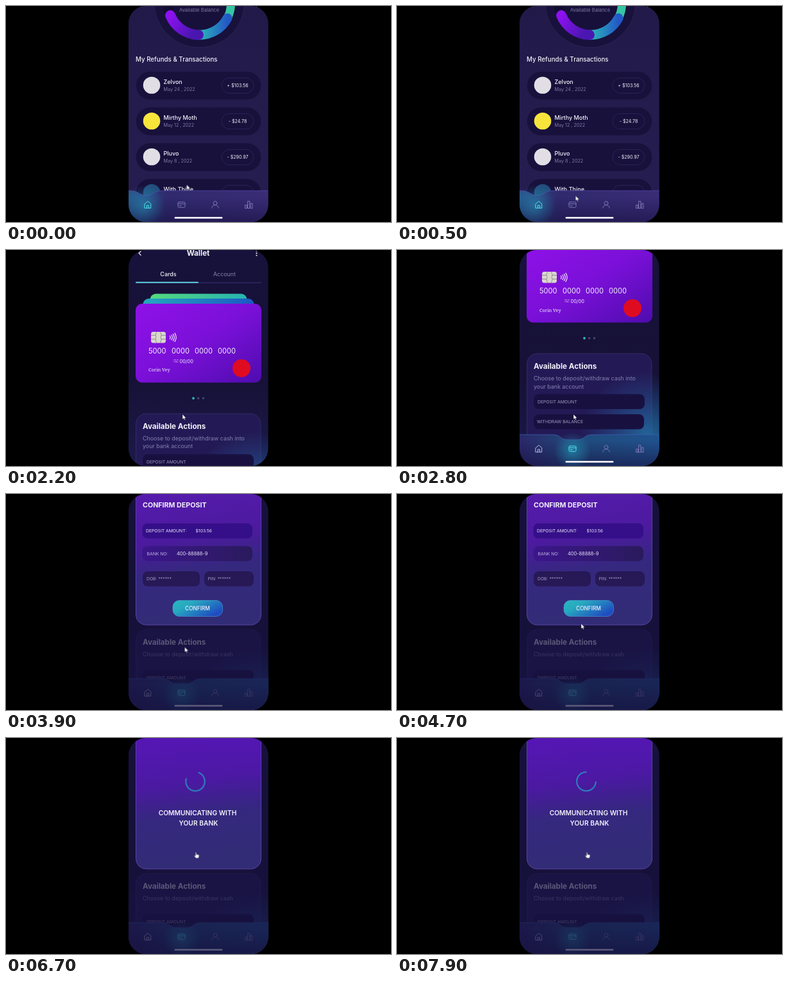
An HTML page for the animation above (8000 ms loop, 600 by 338 pixels).

```html
<!DOCTYPE html>
<html lang="en">
<head>
<meta charset="utf-8">
<title>Wallet app</title>
<style>
html, body { margin: 0; width: 100%; height: 100%; overflow: hidden; background: #000; }
svg { display: block; width: 100vw; height: 100vh; }
text { font-family: Inter, "Open Sans", sans-serif; fill: #f3f1fb; }
.mid { text-anchor: middle; }
.h1 { font-size: 11.65px; font-weight: 700; }
.h2 { font-size: 9.75px; font-weight: 500; }
.body { font-size: 8.9px; fill: #8580b0; }
.name { font-size: 9px; font-weight: 500; }
.date { font-size: 7.2px; fill: #7f79a8; }
.sum { font-size: 7.1px; text-anchor: middle; }
.label { font-size: 6.8px; fill: #a09bc0; }
.lit { fill: #e9e5fa; }
.digits { font-size: 11.1px; }
.icon { fill: none; stroke: #7d76b2; stroke-width: 1; stroke-linejoin: round; stroke-linecap: round; }
.on { stroke: #4fe3ea; }
.pale { stroke: #bdb9df; }

.home, .page, .bar, .dim, .extra, .form, .load, .cursor, .arrow, .hand {
  animation: 8s linear infinite;
}
.home { animation-name: home; }
.page { animation-name: scroll; }
.bar { animation-name: bar; }
.dim { animation-name: dim; }
.extra { animation-name: extra; }
.form { animation-name: form; }
.load { animation-name: load; }
.cursor { animation-name: move; animation-timing-function: ease-in-out; }
.arrow { animation-name: arrow; animation-timing-function: step-end; }
.hand { animation-name: hand; animation-timing-function: step-end; }
.spin { transform-origin: 295px 68px; animation: spin 1s linear infinite; }

@keyframes home { 0%, 16.5% { opacity: 1; } 21%, 100% { opacity: 0; } }
@keyframes scroll {
  0%, 27.5% { transform: translateY(0); animation-timing-function: ease-in-out; }
  34.5%, 42% { transform: translateY(-94px); animation-timing-function: ease-out; }
  46%, 100% { transform: translateY(-44px); }
}
@keyframes bar {
  0%, 28% { transform: translateY(52px); animation-timing-function: ease-out; }
  33%, 100% { transform: none; }
}
@keyframes dim { 0%, 42% { opacity: 0; } 46.5%, 100% { opacity: 1; } }
@keyframes extra { 0%, 42% { opacity: 1; } 46%, 100% { opacity: 0; } }
@keyframes form { 0%, 72.5% { opacity: 1; } 76%, 100% { opacity: 0; } }
@keyframes load { 0%, 72.5% { opacity: 0; } 76%, 100% { opacity: 1; } }
@keyframes move {
  0% { transform: translate(281.5px, 279.5px); }
  10% { transform: translate(277px, 304px); }
  13.75%, 17.5% { transform: translate(276px, 307px); }
  26%, 39% { transform: translate(275px, 257px); }
  43%, 50% { transform: translate(278.5px, 239.5px); }
  66%, 72% { transform: translate(293px, 176.5px); }
  80%, 100% { transform: translate(296.5px, 178.5px); }
}
@keyframes arrow { 0% { opacity: 1; } 61%, 100% { opacity: 0; } }
@keyframes hand { 0% { opacity: 0; } 61%, 100% { opacity: 1; } }
@keyframes spin { from { transform: rotate(36deg); } to { transform: rotate(396deg); } }
</style>
</head>
<body>
<svg viewBox="0 0 600 338">
<defs>
  <clipPath id="phone"><rect x="191" width="217.600" height="338" rx="27"/></clipPath>
  <linearGradient id="homeBg" x2="0" y2="1">
    <stop stop-color="#211a49"/><stop offset=".5" stop-color="#241c4d"/><stop offset="1" stop-color="#261e51"/>
  </linearGradient>
  <linearGradient id="walletBg" x2="0" y2="1">
    <stop stop-color="#17123b"/><stop offset=".6" stop-color="#171136"/><stop offset="1" stop-color="#1a1a4b"/>
  </linearGradient>
  <linearGradient id="homeBar">
    <stop stop-color="#27568c"/><stop offset=".28" stop-color="#302a6e"/><stop offset="1" stop-color="#3a2c76"/>
  </linearGradient>
  <linearGradient id="walletBar">
    <stop stop-color="#2b2768"/><stop offset=".4" stop-color="#204a7b"/><stop offset="1" stop-color="#20528e"/>
  </linearGradient>
  <linearGradient id="shade" x2="0" y2="1">
    <stop stop-color="#171040" stop-opacity="0"/><stop offset="1" stop-color="#171040" stop-opacity=".6"/>
  </linearGradient>
  <radialGradient id="glow">
    <stop stop-color="#25b4cf" stop-opacity=".75"/><stop offset="1" stop-color="#25b4cf" stop-opacity="0"/>
  </radialGradient>
  <radialGradient id="blue">
    <stop stop-color="#217fb0" stop-opacity=".75"/><stop offset="1" stop-color="#2566a8" stop-opacity="0"/>
  </radialGradient>
  <linearGradient id="violet" x2="1" y2="1">
    <stop stop-color="#9011e8"/><stop offset=".5" stop-color="#7a10d8"/><stop offset="1" stop-color="#4e0cae"/>
  </linearGradient>
  <linearGradient id="green"><stop stop-color="#55da7d"/><stop offset="1" stop-color="#26b3b2"/></linearGradient>
  <linearGradient id="sea"><stop stop-color="#24a9bd"/><stop offset="1" stop-color="#1b58c4"/></linearGradient>
  <linearGradient id="button" x2="1" y2=".6">
    <stop stop-color="#2ab8bd"/><stop offset=".35" stop-color="#27a9c0"/><stop offset="1" stop-color="#1f4dc1"/>
  </linearGradient>
  <linearGradient id="arcA" x2="1" y2=".4"><stop stop-color="#8c11f0"/><stop offset="1" stop-color="#4a16b0"/></linearGradient>
  <linearGradient id="arcB" x2="1"><stop stop-color="#2bb9b8"/><stop offset="1" stop-color="#2358c6"/></linearGradient>
  <linearGradient id="popup" x2=".12" y2="1">
    <stop stop-color="#5a1bb2"/><stop offset=".45" stop-color="#4c1a9f"/>
    <stop offset=".68" stop-color="#35287f"/><stop offset="1" stop-color="#322c76"/>
  </linearGradient>
  <linearGradient id="bright" x2="0" y2="1">
    <stop stop-color="#5913c2" stop-opacity=".65"/><stop offset="1" stop-color="#4516a8" stop-opacity="0"/>
  </linearGradient>
  <linearGradient id="field"><stop stop-color="#3c168b"/><stop offset="1" stop-color="#2a1a5c"/></linearGradient>

  <g id="row">
    <rect x="202.300" y="102.200" width="195.400" height="44.600" rx="22.300" fill="#18113c" stroke="#271f50" stroke-width=".7"/>
    <rect x="336" y="112.500" width="50" height="24" rx="12" fill="#18113c" stroke="#30285c" stroke-width=".8"/>
  </g>
  <path id="house" d="M216.300 309.500 221 305.500l4.700 4v6.700h-9.400zM219.500 316v-4h3v4"/>
  <g id="pass"><rect x="268" y="306.800" width="11" height="8.400" rx="1.500"/><path d="M268 309.600h11M270 312.500h3"/></g>
  <g id="person"><circle cx="326" cy="308.500" r="2.900"/><path d="M320.800 316c.3-6 10.100-6 10.400 0"/></g>
  <path id="bars" d="M373 311.500h2.500v5H373zM377 305.500h2.800v11H377zM381.500 309h2.500v7.500h-2.500z"/>
  <rect id="grip" x="262.500" y="330" width="75" height="2.800" rx="1.400" fill="#efedf8"/>
</defs>

<rect width="600" height="338"/>
<g clip-path="url(#phone)">

  <!-- wallet -->
  <rect x="191" width="218" height="338" fill="url(#walletBg)"/>
  <g class="page">
    <path d="M210.500 1.500 207 5l3.500 3.500" fill="none" stroke="#f3f1fb" stroke-width="1.200"/>
    <text class="h1 mid" x="299.500" y="9">Wallet</text>
    <g fill="#f3f1fb"><circle cx="390.500" cy="1.500" r="1.100"/><circle cx="390.500" cy="5" r="1.100"/><circle cx="390.500" cy="8.500" r="1.100"/></g>
    <text class="mid name" x="253" y="41">Cards</text>
    <text class="mid body" x="340.500" y="41">Account</text>
    <rect x="202" y="50.300" width="196" height="1.600" rx=".8" fill="#2b2560"/>
    <rect x="202" y="49.800" width="98" height="2" rx="1" fill="#62cfe2"/>

    <rect x="224.500" y="68.500" width="151" height="40" rx="9" fill="url(#green)"/>
    <rect x="213.500" y="76" width="173" height="40" rx="9" fill="url(#sea)"/>
    <rect x="202" y="84" width="196" height="123.500" rx="10" fill="url(#violet)"/>
    <rect x="226" y="128" width="23" height="17.500" rx="3.500" fill="#d9d6cf"/>
    <path d="M226 133.500h7q2 3 0 6h-7M249 133.500h-7q-2 3 0 6h7M233 133.500q0-3 2-5.500M242 133.500q0-3-2-5.500M233 139.500q0 3 2 6M242 139.500q0 3-2 6" fill="none" stroke="#77716f" stroke-width=".7"/>
    <path d="M255.500 134.500q1.500 2.300 0 4.600M258 133q2.400 3.800 0 7.600M260.500 131.600q3.400 5.200 0 10.400M263 130.200q4.300 6.600 0 13.200" fill="none" stroke="#f0eafa" stroke-width="1.200" stroke-linecap="round"/>
    <text class="digits" y="162"><tspan x="222">5000</tspan><tspan x="258">0000</tspan><tspan x="294">0000</tspan><tspan x="330">0000</tspan></text>
    <text y="173.200" font-size="2.700"><tspan x="261">VALID</tspan><tspan x="261" dy="2.800">THRU</tspan></text>
    <text x="270.500" y="176.700" font-size="7.400">00/00</text>
    <text x="222" y="190.500" font-size="7.300" font-weight="500" style="font-family: 'Noto Serif', serif">Corin Vey</text>
    <circle cx="367" cy="185" r="14" fill="#df0b20"/>

    <circle cx="292" cy="232" r="1.900" fill="#2fb9b7"/>
    <circle cx="299.700" cy="232" r="1.800" fill="#4a4377"/>
    <circle cx="307.500" cy="232" r="1.800" fill="#4a4377"/>

    <rect x="202.500" y="256" width="194.500" height="170" rx="16" fill="#231a55" stroke="#37306d" stroke-width=".8"/>
    <ellipse cx="390" cy="385" rx="105" ry="100" fill="url(#blue)"/>
    <text class="h1" x="213" y="280">Available Actions</text>
    <text class="body" x="213" y="298">Choose to deposit/withdraw cash<tspan class="extra"> into</tspan></text>
    <text class="body extra" x="213" y="310.500">your bank account</text>
    <rect x="213" y="319.500" width="173" height="23.500" rx="8" fill="#181140"/>
    <text class="label" x="219" y="333.700">DEPOSIT AMOUNT</text>
    <rect x="213" y="351" width="172" height="23.500" rx="8" fill="#181140"/>
    <text class="label" x="218" y="365">WITHDRAW BALANCE</text>
  </g>

  <g class="bar">
    <path d="M190 289H243C256 289 254 297 266 297H281C293 297 291 289 304 289H410V339H190z" fill="url(#walletBar)" stroke="#3d5fae" stroke-width=".8"/>
    <path d="M191 298H409V338H191z" fill="url(#shade)"/>
    <circle cx="273.500" cy="314" r="29" fill="url(#glow)" opacity=".65"/>
    <use href="#house" class="icon pale"/><use href="#pass" class="icon on"/>
    <use href="#person" class="icon"/><use href="#bars" class="icon"/>
    <use href="#grip"/>
  </g>

  <!-- deposit dialog -->
  <g class="dim">
    <rect x="191" width="218" height="338" fill="#17123d" opacity=".69"/>
    <rect x="202.500" y="-30" width="195" height="235" rx="16" fill="url(#popup)" stroke="#654bb0" stroke-width=".8"/>
    <g class="form">
      <text x="213" y="21" font-size="10.700" font-weight="700">CONFIRM DEPOSIT</text>
      <rect x="212.500" y="46" width="171.500" height="23.500" rx="8" fill="#350f89"/>
      <text class="label lit" x="218" y="60.400">DEPOSIT AMOUNT:</text>
      <text class="label lit" x="295.500" y="60.400">$103.56</text>
      <rect x="212.500" y="81.500" width="171.500" height="23.500" rx="8" fill="url(#field)"/>
      <text class="label" x="219.500" y="95.600" style="fill: #bcb0de">BANK NO:</text>
      <text class="lit" x="266" y="95.600" font-size="7.400">400-88888-9</text>
      <rect x="213" y="121" width="89" height="23.500" rx="8" fill="#271856"/>
      <text class="label" x="219" y="135.200">DOB: ******</text>
      <rect x="309" y="121" width="77" height="23.500" rx="8" fill="#271856"/>
      <text class="label" x="314.500" y="135.200">PIN: ******</text>
      <rect x="260" y="166.500" width="77.500" height="25" rx="10" fill="url(#button)" stroke="#4fa3d8" stroke-width=".6"/>
      <text class="mid" x="298.500" y="181.700" font-size="8.300" font-weight="500">CONFIRM</text>
    </g>
    <g class="load">
      <rect x="203" y="-30" width="194" height="150" fill="url(#bright)"/>
      <circle class="spin" cx="295" cy="68" r="14.800" fill="none" stroke="#2b83bd" stroke-width="2" stroke-dasharray="69.700 23.300"/>
      <g class="mid" font-size="10.250" font-weight="600">
        <text x="298.500" y="121">COMMUNICATING WITH</text>
        <text x="300" y="137">YOUR BANK</text>
      </g>
    </g>
  </g>

  <!-- home -->
  <g class="home">
    <rect x="191" width="218" height="338" fill="url(#homeBg)"/>
    <circle cx="301.300" cy="-5.500" r="70.300" fill="#18113c" stroke="#2d2558" stroke-width=".8"/>
    <circle cx="301.500" cy="-4" r="49" fill="#17103a" stroke="#130d32" stroke-width="15"/>
    <g fill="none" stroke-linecap="round">
      <path d="M345 19A49 49 0 0 0 350.500-4" stroke="#35c5a3" stroke-width="13"/>
      <path d="M300 45.200A49 49 0 0 0 345 19" stroke="url(#arcB)" stroke-width="15"/>
      <path d="M256 14.500A49 49 0 0 0 300 45.200" stroke="url(#arcA)" stroke-width="15.800"/>
    </g>
    <text class="mid" x="301" y="8.500" font-size="7.500" style="fill: #7f79a8">Available Balance</text>
    <text class="h2" x="202" y="87">My Refunds &amp; Transactions</text>

    <g>
      <use href="#row"/><circle cx="227" cy="124" r="13.300" fill="#e1dfe5"/>
      <text class="name" x="245.500" y="122">Zelvon</text><text class="date" x="245.500" y="133">May 24 , 2022</text>
      <text class="sum" x="361" y="127">+ $103.56</text>
    </g>
    <g transform="translate(0 56)">
      <use href="#row"/><circle cx="227" cy="124" r="13.300" fill="#f8e53c"/>
      <text class="name" x="245.500" y="122">Mirthy Moth</text><text class="date" x="245.500" y="133">May 12 , 2022</text>
      <text class="sum" x="361" y="127">- $24.78</text>
    </g>
    <g transform="translate(0 112)">
      <use href="#row"/><circle cx="227" cy="124" r="13.300" fill="#e1dfe5"/>
      <text class="name" x="245.500" y="122">Pluvo</text><text class="date" x="245.500" y="133">May 8 , 2022</text>
      <text class="sum" x="361" y="127">- $290.97</text>
    </g>
    <g transform="translate(0 168)">
      <use href="#row"/><circle cx="227" cy="124" r="13.300" fill="#23507f"/>
      <text class="name" x="245.500" y="122">With Thine</text>
    </g>

    <path d="M190 289H194C206 289 208 296.500 219 296.500S231 289 243 289H410V339H190z" fill="url(#homeBar)" stroke="#5548a8" stroke-width=".8"/>
    <path d="M191 298H409V338H191z" fill="url(#shade)"/>
    <circle cx="215" cy="312" r="32" fill="url(#glow)" opacity=".55"/>
    <use href="#house" class="icon on"/><use href="#pass" class="icon"/>
    <use href="#person" class="icon"/><use href="#bars" class="icon"/>
    <use href="#grip"/>
  </g>
</g>

<g class="cursor" fill="#fff" stroke="#15102e" stroke-width=".5">
  <path class="arrow" d="M0 0V8L1.900 6.400 3.100 9 4.400 8.400 3.300 5.900H5.800z"/>
  <path class="hand" d="M-1.200.9Q-.5-.4.300.9V3.600L3.800 4.300Q4.600 4.600 4.500 5.600L3.700 9.500H-.6L-3.300 6Q-3 4.700-1.200 6z"/>
</g>
</svg>
</body>
</html>
```
